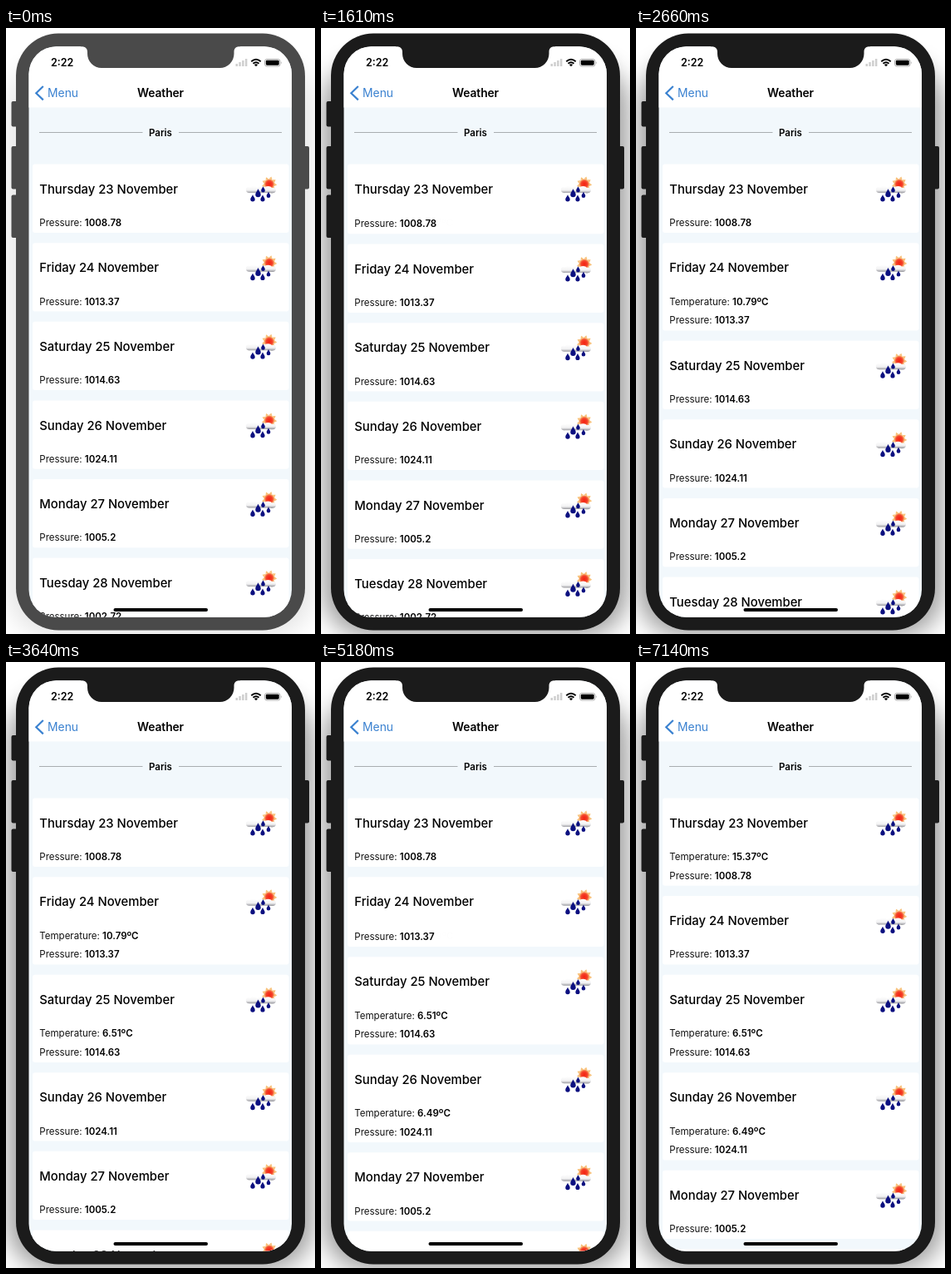
Recreate the animation shown at these times as an HTML page. Size 372x728 px, loop 7210 ms.

```html
<!DOCTYPE html>
<html lang="en">
<head>
<meta charset="utf-8">
<title>Weather list</title>
<style>
  html, body { margin: 0; width: 100%; height: 100%; overflow: hidden; background: #fff; }
  svg { display: block; width: 372px; height: 728px; font-family: Inter, Roboto, sans-serif; }
  .day { font-size: 14.8px; font-weight: 500; }
  .row { font-size: 11.5px; fill: #111; }
  .bold { font-weight: 600; fill: #000; }
</style>
</head>
<body>
<svg viewBox="0 0 372 728" xmlns="http://www.w3.org/2000/svg">
  <defs>
    <clipPath id="screen"><rect x="27.500" y="22.300" width="316.500" height="685.500" rx="33"/></clipPath>
    <filter id="blur" x="-20%" y="-20%" width="140%" height="140%"><feGaussianBlur stdDeviation="14"/></filter>
    <linearGradient id="cloud" x1="0" y1="0" x2="0" y2="1">
      <stop offset="0" stop-color="#fff"/>
      <stop offset=".6" stop-color="#f2f2f3"/>
      <stop offset="1" stop-color="#909096"/>
    </linearGradient>
    <radialGradient id="sun">
      <stop offset="0" stop-color="#f5230f"/>
      <stop offset=".6" stop-color="#f4402a"/>
      <stop offset="1" stop-color="#f8b56c"/>
    </radialGradient>
    <path id="drop" d="M0-4.2C1-1.8 2.6-.6 2.6 1.2A2.6 2.6 0 0 1-2.6 1.2C-2.6-.6-1-1.8 0-4.2Z" fill="#0c1080"/>
    <!-- Placed relative to the top left corner of a card -->
    <g id="icon" transform="translate(285 24)">
      <g id="rays" fill="#f8c27c"></g>
      <circle r="6.2" fill="url(#sun)"/>
      <path d="M-28 7.500C-29 4-25 2.500-23 4C-21 1-16 2-15 4.500C-12 2-7 2.500-6 5C-5 1.500 2 2 3 4.500C7 3.500 9 6 7.500 9C6 11.500 2 11 0 10.500H-23C-26 11-28 9.500-28 7.500Z" fill="url(#cloud)"/>
      <use href="#drop" transform="translate(-13.500 11) scale(1.25)"/>
      <use href="#drop" transform="translate(-7.500 6.500) scale(.9)"/>
      <use href="#drop" transform="translate(-20 17) scale(1.05)"/>
      <use href="#drop" transform="translate(-8 17)"/>
      <use href="#drop" transform="translate(-1 13) scale(.9)"/>
    </g>
  </defs>

  <rect width="372" height="728" fill="#fff"/>
  <rect id="shadow" x="2" y="40" width="368" height="690" rx="54" filter="url(#blur)"/>
  <g id="body">
    <rect x="6.500" y="88" width="10" height="30.500" rx="2"/>
    <rect x="6.500" y="142" width="10" height="51.500" rx="2"/>
    <rect x="6.500" y="200.500" width="10" height="51.500" rx="2"/>
    <rect x="355" y="142" width="10" height="51.500" rx="2"/>
    <rect x="12" y="6.500" width="348" height="717" rx="51"/>
  </g>

  <g clip-path="url(#screen)">
    <rect x="27" y="22" width="318" height="686" fill="#f2f8fc"/>
    <rect x="27" y="22" width="318" height="73.500" fill="#fff"/>
    <path d="M40 125.500H164.500M208 125.500H332" stroke="#a9adb0"/>
    <text x="186" y="130" text-anchor="middle" class="row bold">Paris</text>
    <g id="cards"></g>
  </g>
  <path id="notch" d="M90 20H282V22.300C277 22.300 274.500 24 274.500 29V31A17 17 0 0 1 257.500 48H115A17 17 0 0 1 98 31V29C98 24 95 22.300 90 22.300Z"/>

  <text x="54" y="45.700" font-size="12.500" font-weight="600">2:22</text>
  <path d="M276.500 43h2.500v3h-2.500zM280.300 41h2.500v5h-2.500zM284.100 39h2.500v7h-2.500zM287.900 37h2.500v9h-2.500z" fill="#cfcfcf"/>
  <path d="M295.300 40.200Q301 35.400 306.700 40.200M297.500 42.700Q301 39.600 304.500 42.700" fill="none" stroke="#000" stroke-width="1.900"/>
  <path d="M298.900 44.100Q301 42.500 303.100 44.100L301 46.300Z"/>
  <rect x="311.500" y="37.500" width="18.500" height="8.500" rx="2.500" fill="none" stroke="#999" stroke-width=".8"/>
  <rect x="312.800" y="38.800" width="15.900" height="5.900" rx="1.400"/>
  <path d="M331 40.200Q332.300 41.700 331 43.300Z" fill="#999"/>

  <path d="M44.800 70L36.300 78.200L44.800 86.400" fill="none" stroke="#3b82d0" stroke-width="2.200"/>
  <text x="50" y="82.800" font-size="13.900" fill="#3b82d0">Menu</text>
  <text x="186" y="82.800" font-size="13.800" font-weight="600" text-anchor="middle" letter-spacing="-.1">Weather</text>
  <rect x="129.500" y="697" width="113.500" height="4" rx="2"/>
</svg>
<script>
const LOOP = 7210, STEP = 70, EASE_TIME = 300, WAKE = 140;
const TOP = 163.6, PITCH = 94.6, HEIGHT = 82.3, GROWTH = 22.9;
// Toggle times alternate between opening and closing.
const days = [
  ["Thursday 23", "15.37", "1008.78", [455, 1355, 5950]],
  ["Friday 24", "10.79", "1013.37", [2135, 4925]],
  ["Saturday 25", "6.51", "1014.63", [3115]],
  ["Sunday 26", "6.49", "1024.11", [4000]],
  ["Monday 27", "", "1005.2", []],
  ["Tuesday 28", "", "1002.72", []]
];
const $ = id => document.getElementById(id);

$("rays").innerHTML = Array.from({length: 9}, (_, i) =>
  `<path d="M-2.200-6L0-9.300L2.200-6Z" transform="rotate(${i * 40 + 15})"/>`).join("");

const row = (label, value, cls) =>
  `<text x="8.300" y="74.400" class="row ${cls}">${label}: <tspan class="bold">${value}</tspan></text>`;

$("cards").innerHTML = days.map(([day, temperature, pressure]) => `<g>
  <rect class="panel" width="308.500" height="${HEIGHT}" rx="3" fill="#fff"/>
  <text x="8.300" y="35.200" class="day">${day} November</text>
  <use href="#icon"/>
  ${row("Temperature", temperature + "ºC", "temperature")}
  ${row("Pressure", pressure, "pressure")}
</g>`).join("");

const cards = [...$("cards").children].map((group, i) => ({
  group,
  toggles: days[i][3],
  panel: group.querySelector(".panel"),
  temperature: group.querySelector(".temperature"),
  pressure: group.querySelector(".pressure")
}));

const clamp = x => Math.min(1, Math.max(0, x));
const ease = x => x * x * (3 - 2 * x);
const openness = (toggles, t) => toggles.reduce((sum, start, i) =>
  sum + (i % 2 ? -1 : 1) * ease(clamp((t - start) / EASE_TIME)), 0);

function draw(t) {
  const awake = t >= WAKE;
  const shell = awake ? "#1b1b1b" : "#4a4a4a";
  $("body").setAttribute("fill", shell);
  $("notch").setAttribute("fill", shell);
  $("shadow").setAttribute("opacity", awake ? .38 : .1);

  let shift = 0;
  cards.forEach((card, i) => {
    const open = openness(card.toggles, t);
    const extra = open * GROWTH;
    card.group.setAttribute("transform", `translate(32 ${TOP + i * PITCH + shift})`);
    card.panel.setAttribute("height", HEIGHT + extra);
    card.pressure.setAttribute("transform", `translate(0 ${extra})`);
    card.temperature.setAttribute("opacity", open * open);
    shift += extra;
  });
}

function tick(now) {
  draw(Math.floor(now % LOOP / STEP) * STEP);
  requestAnimationFrame(tick);
}
draw(0);
requestAnimationFrame(tick);
</script>
</body>
</html>
```
